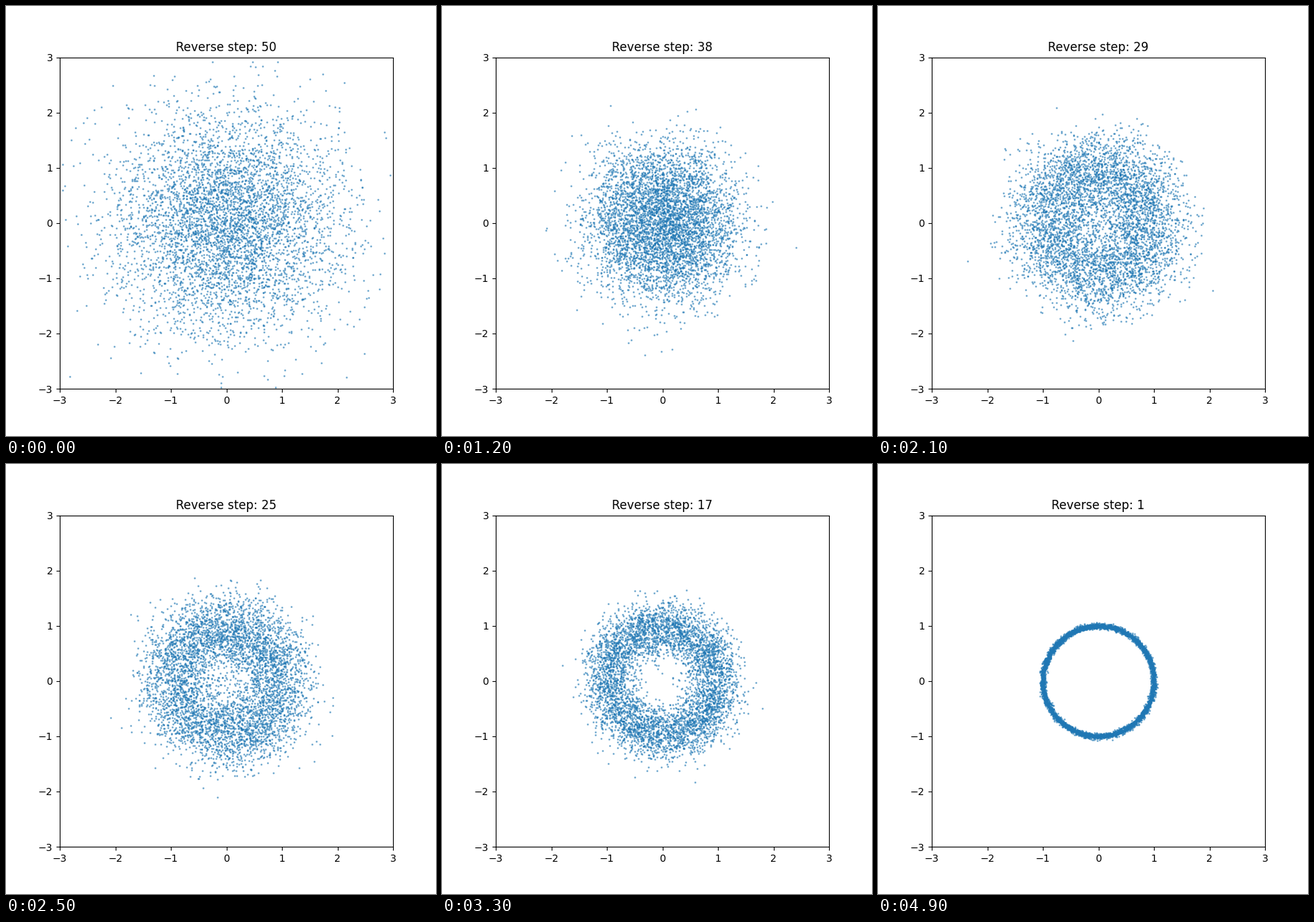
A matplotlib script that plays this animation: 600x600 px, repeating every 5000 ms.

```python
import numpy as np
import matplotlib.pyplot as plt
from matplotlib.animation import FuncAnimation

STEPS = 50
COUNT = 5000
rng = np.random.default_rng(7)

# Linear noise schedule: share of signal kept after each diffusion step.
betas = np.linspace(1e-4, 0.02, STEPS + 1)
keep = np.cumprod(1 - betas)


def smoothstep(t):
    t = np.clip(t, 0, 1)
    return t * t * (3 - 2 * t)


def diffuse():
    """Noise a unit ring step by step; entry k holds the cloud at step k."""
    angle = rng.uniform(0, 2 * np.pi, COUNT)
    ring = np.column_stack([np.cos(angle), np.sin(angle)])
    noise = np.zeros((COUNT, 2))
    clouds = []
    for k in range(STEPS + 1):
        noise = (np.sqrt(1 - betas[k]) * noise
                 + np.sqrt(betas[k]) * rng.normal(size=(COUNT, 2)))
        # The last steps lose the ring and widen to a unit Gaussian.
        radius = np.sqrt(keep[k]) * (1 - smoothstep((k - 31) / 19))
        widen = 1 + (1 / np.sqrt(1 - keep[-1]) - 1) * np.exp((k - STEPS) / 3.8)
        clouds.append(radius * ring + widen * noise)
    return clouds


clouds = diffuse()

fig, ax = plt.subplots(figsize=(6, 6), dpi=100)
fig.subplots_adjust(top=0.8804)
ax.set_xlim(-3, 3)
ax.set_ylim(-3, 3)
title = ax.set_title("")
dots = ax.scatter(*clouds[STEPS].T, s=1, alpha=0.5)


def update(frame):
    step = STEPS - frame
    dots.set_offsets(clouds[step])
    title.set_text(f"Reverse step: {step}")
    return dots, title


anim = FuncAnimation(fig, update, frames=STEPS, interval=100,
                     repeat=True, repeat_delay=0)
plt.show()
```
